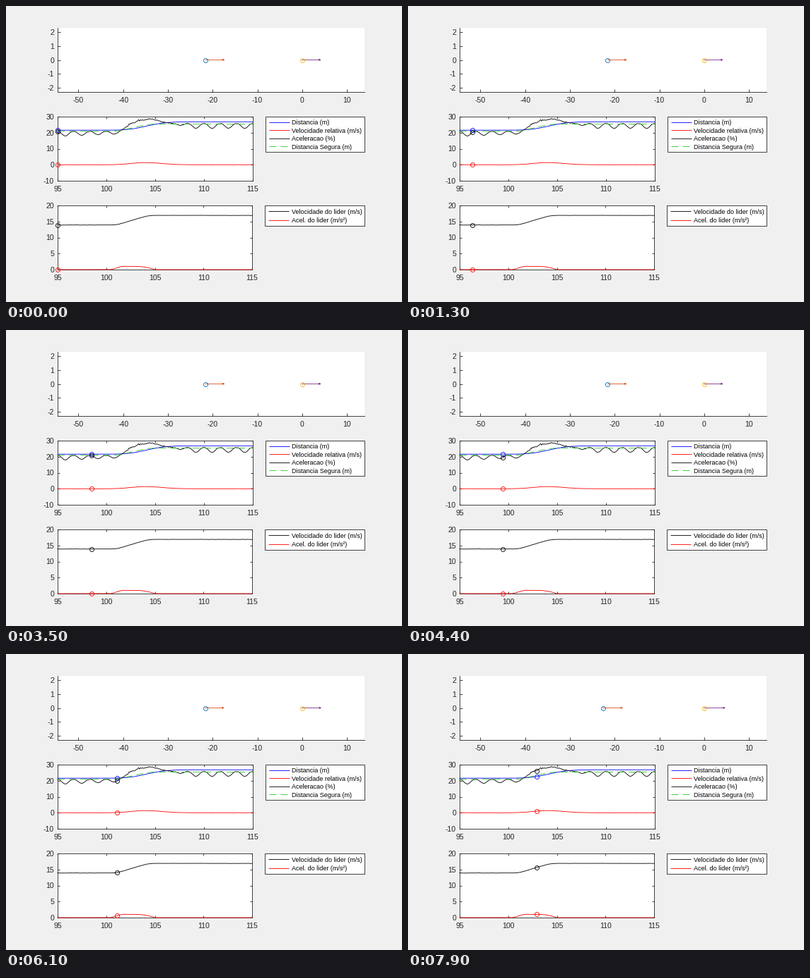
These frames come from a looping animation (560 by 420 pixels, 8000 ms). A matplotlib script:

```python
import matplotlib.pyplot as plt
import numpy as np
from matplotlib.animation import FuncAnimation
from matplotlib.lines import Line2D
from matplotlib.patches import Rectangle

W, H, DPI = 560, 420, 80
PX = 72 / DPI  # points per pixel
FRAMES, INTERVAL = 80, 100
INK = "#262626"
BLUE, ORANGE, GOLD, PURPLE = "#0072bd", "#d95319", "#edb120", "#7e2f8e"
GREEN = (0.15, 0.78, 0.15)
LINE = 0.85 * PX
DASH = (10 * PX, 6 * PX)
ARROW_SCALE = 0.296

plt.rcParams.update({
    "font.family": "Liberation Sans",
    "axes.unicode_minus": False,
    "lines.scale_dashes": False,
})


def ramp(x, a, b):
    u = np.clip((x - a) / (b - a), 0, 1)
    return u * u * (3 - 2 * u)


def bell(x, mid, width):
    return np.exp(-0.5 * ((x - mid) / width) ** 2)


def integrate(y, x):
    return np.concatenate([[0], np.cumsum((y[1:] + y[:-1]) / 2 * np.diff(x))])


# Signals sampled every 0.1 s
rng = np.random.default_rng(4)
t = np.linspace(95, 115, 201)

lead_acc = 1.02 * ramp(t, 100.3, 101.8) * (1 - np.clip((t - 103) / 2, 0, 1) ** 2)
gain = integrate(lead_acc, t)
lead_vel = 13.9 + 3 * gain / gain[-1]

rel_vel = 1.37 * bell(t, 104, np.where(t < 104, 1.41, 1.64))
dist = 21.55 + integrate(rel_vel, t)
safe = 1.5 * lead_vel
own_vel = lead_vel - rel_vel

# Throttle: a step with overshoot, rippling while the speed is steady
depth = np.interp(t, [95, 101.2, 101.6, 106.5, 109, 115], [3, 1.6, 0, 0, 3, 3])
ripple = (0.5 + 0.5 * np.cos(2 * np.pi * (t - 95.8) / 1.67)) ** 1.3
rough = np.where((t > 102) & (t < 107), 0.3, 0.06)
throttle = (20.8 + 4.9 * ramp(t, 101.1, 102.9) + 2.8 * bell(t, 104.3, 1)
            - depth * ripple + rough * rng.standard_normal(t.size))

lead_line = lead_vel + 0.02 * rng.standard_normal(t.size)
rel_line = rel_vel + 0.03 * rng.standard_normal(t.size)

fig = plt.figure(figsize=(W / DPI, H / DPI), dpi=DPI, facecolor="#f0f0f0")


def panel(x0, y0, x1, y1, xlim, ylim, xticks, yticks, tick, box=True):
    ax = fig.add_axes([x0 / W, 1 - y1 / H, (x1 - x0) / W, (y1 - y0) / H])
    ax.set(xlim=xlim, ylim=ylim, xticks=xticks, yticks=yticks)
    ax.tick_params(direction="in", length=tick * PX, width=LINE, color=INK,
                   labelcolor=INK, labelsize=10.5 * PX, top=box, right=box)
    ax.tick_params(axis="x", pad=7 * PX)
    ax.tick_params(axis="y", pad=5 * PX)
    for side, spine in ax.spines.items():
        spine.set(color=INK, linewidth=LINE, visible=box or side in ("left", "bottom"))
    return ax


def curve(ax, y, color, **kw):
    ax.plot(t, y, color=color, lw=LINE, clip_on=False, zorder=3, **kw)


def ring(ax, color):
    return ax.plot([], [], "o", ms=6 * PX, mfc="none", mec=color, mew=LINE,
                   clip_on=False, zorder=5)[0]


def legend(x0, y0, x1, y1, entries):
    fig.add_artist(Rectangle((x0 / W, 1 - y1 / H), (x1 - x0) / W, (y1 - y0) / H,
                             fc="white", ec=INK, lw=LINE))
    step = (y1 - y0 - 4) / len(entries)
    for i, (label, color, *dashes) in enumerate(entries):
        y = y0 + 2 + step * (i + 0.5)
        line = Line2D([(x0 + 5) / W, (x0 + 34) / W], [1 - y / H] * 2,
                      color=color, lw=LINE, solid_capstyle="butt")
        if dashes:
            line.set_dashes(dashes[0])
        fig.add_artist(line)
        fig.text((x0 + 37.5) / W, 1 - (y + 3.5) / H, label, size=9 * PX,
                 color="black", va="baseline")


road = panel(73, 31, 507, 122, (-54.66, 13.95), (-2.29, 2.29),
             range(-50, 11, 10), range(-2, 3), 4.3, box=False)
gap = panel(73, 157, 349, 248, (95, 115), (-10, 30),
            range(95, 116, 5), range(-10, 31, 10), 2.8)
lead = panel(73, 283, 348, 374, (95, 115), (0, 20),
             range(95, 116, 5), range(0, 21, 5), 2.8)

curve(gap, dist, "blue")
curve(gap, rel_line, "red")
curve(gap, throttle, "black")
curve(gap, safe, GREEN, dashes=DASH)
curve(lead, lead_line, "black")
curve(lead, lead_acc, "red")

legend(367, 157, 507, 207, [
    ("Distancia (m)", "blue"),
    ("Velocidade relativa (m/s)", "red"),
    ("Aceleracao (%)", "black"),
    ("Distancia Segura (m)", GREEN, DASH)])
legend(366, 283, 507, 312, [
    ("Velocidade do lider (m/s)", "black"),
    ("Acel. do lider (m/s²)", "red")])

trackers = [(ring(gap, "blue"), dist), (ring(gap, "red"), rel_vel),
            (ring(gap, "black"), throttle), (ring(lead, "black"), lead_vel),
            (ring(lead, "red"), lead_acc)]


def vehicle(ring_color, arrow_color):
    body = ring(road, ring_color)
    arrow, = road.plot([], [], color=arrow_color, lw=LINE, zorder=4)
    return body, arrow


follower = vehicle(BLUE, ORANGE)
leader = vehicle(GOLD, PURPLE)


def place(car, x, speed):
    body, arrow = car
    tip = x + ARROW_SCALE * speed
    back = tip - 0.3
    body.set_data([x], [0])
    arrow.set_data([x, tip, back, tip, back], [0, 0, 0.04, 0, -0.04])


def update(i):
    for dot, y in trackers:
        dot.set_data([t[i]], [y[i]])
    place(follower, -dist[i], own_vel[i])
    place(leader, 0, lead_vel[i])
    return []


anim = FuncAnimation(fig, update, frames=FRAMES, interval=INTERVAL,
                     repeat=True, repeat_delay=0, blit=False)
plt.show()
```
